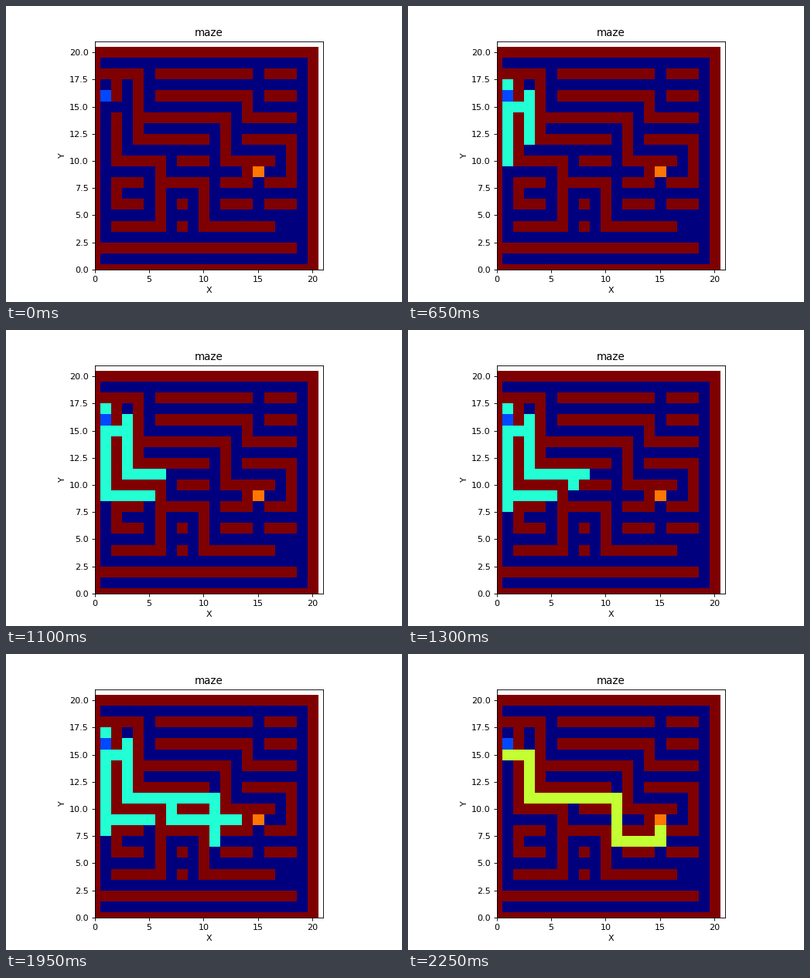
Write a matplotlib script that moves like this. It is 512 px wide and 384 px high and loops after 2750 ms.

```python
import numpy as np
import matplotlib.pyplot as plt
from matplotlib.animation import FuncAnimation

plt.rcParams["text.kerning_factor"] = 6

SIZE = 21
FRAMES, INTERVAL = 55, 50
SOLVED_AT = 45
START, GOAL = (1, 16), (15, 9)
START_VALUE, VISITED, ROUTE, GOAL_VALUE, WALL = 50, 100, 150, 200, 256


def trail(x, y, *moves):
    """Cells from (x, y) along moves that alternate horizontal and vertical."""
    cells = [(x, y)]
    for i, move in enumerate(moves):
        step = int(np.sign(move))
        for _ in range(abs(move)):
            if i % 2 == 0:
                x += step
            else:
                y += step
            cells.append((x, y))
    return cells


def paint(grid, cells, value):
    for x, y in cells:
        grid[y, x] = value


def build_maze():
    maze = np.full((SIZE, SIZE), WALL)
    maze[1:-1, 1:-1] = 0
    maze[2:-2:2, 2:-4:2] = WALL  # pillars, joined below into walls
    walls = [
        trail(0, 18, 4, -6, 6),
        trail(2, 18, 0, -2),
        trail(4, 14, 8, -4, 4),
        trail(6, 18, 8),
        trail(6, 16, 8, -2, 4),
        trail(2, 14, 0, -4, 4, -6, -4),
        trail(14, 12, 4, -4, -2),
        trail(8, 10, 2),
        trail(14, 10, 0, -2, -2),
        trail(4, 8, -2, -2, 2),
        trail(6, 8, 4, -4, 6),
        trail(12, 6, 2),
        trail(0, 2, 18),
    ]
    walls += [trail(16, y, 2) for y in (6, 16, 18)]
    for cells in walls:
        paint(maze, cells, WALL)
    paint(maze, [START], START_VALUE)
    paint(maze, [GOAL], GOAL_VALUE)
    return maze


route = trail(1, 15, 2, -4, 8, -4, 4, 1)

# Branches of the search, each with the depth at which it begins.
branches = [
    (1, route),
    (1, trail(1, 17)),
    (2, trail(1, 14, 0, -5, 4)),
    (4, trail(3, 16)),
    (12, trail(1, 8)),
    (12, trail(7, 10, 0, -1, 3)),
    (18, trail(12, 9, 1)),
]
visits = sorted((depth + i, cell)
                for depth, cells in branches
                for i, cell in enumerate(cells))
explored = [cell for _, cell in visits]

maze = build_maze()
fig, ax = plt.subplots(figsize=(6.4, 4.8), dpi=80)
image = ax.imshow(maze, cmap="jet", vmin=0, vmax=WALL,
                  origin="lower", interpolation="nearest")
ax.set(xlim=(0, SIZE), ylim=(0, SIZE), xlabel="X", ylabel="Y")
ax.set_title("maze", fontsize=12.2)


def update(frame):
    grid = maze.copy()
    if frame < SOLVED_AT:
        paint(grid, explored[:frame], VISITED)
    else:
        paint(grid, route, ROUTE)
    image.set_data(grid)
    return [image]


anim = FuncAnimation(fig, update, frames=FRAMES, interval=INTERVAL, repeat=True)
plt.show()
```
